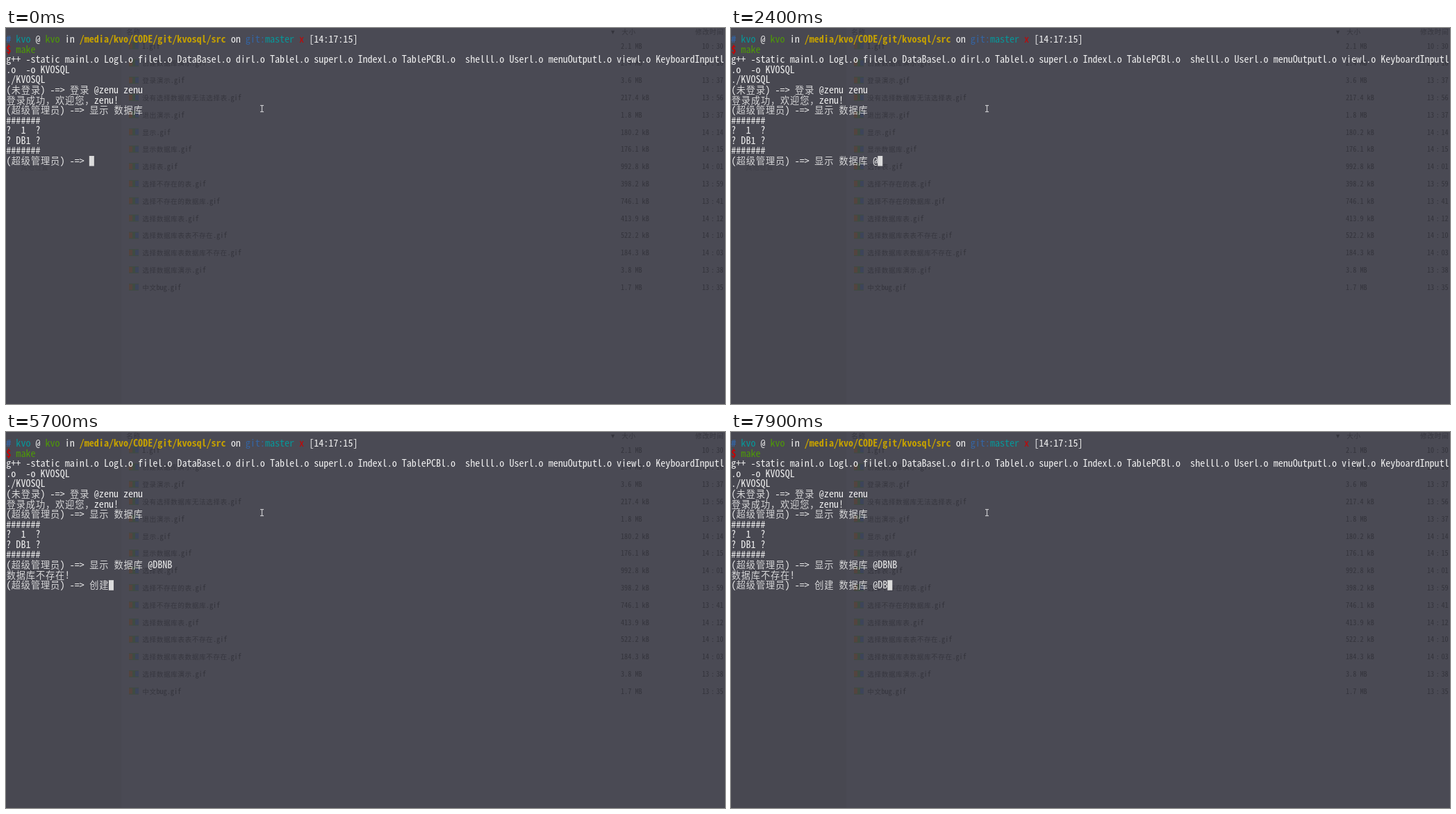
An HTML page with a canvas for the animation above (8000 ms loop, 1035 by 541 pixels).

```html
<!DOCTYPE html>
<html lang="zh-CN">
<head>
<meta charset="utf-8">
<title>Terminal</title>
<style>
html, body { margin: 0; width: 100%; height: 100%; overflow: hidden; background: #4a4a54; }
canvas { display: block; }
</style>
</head>
<body>
<canvas id="stage" width="1035" height="541"></canvas>
<script>
const ctx = document.getElementById('stage').getContext('2d');
const LOOP = 8000, CELL = 7.03, LINE = 14.57, TOP = 9.2;
const WHITE = '#f0f0f0', RED = '#cc0000', GREEN = '#4e9a06', BLUE = '#3465a4', CYAN = '#06989a', GOLD = '#c4a000';
const DIM = '#34343c';
const FONTS = '"Noto Sans Mono CJK SC", "Noto Sans CJK SC", "Noto Sans Mono CJK JP", "Noto Sans CJK JP", "Noto Sans CJK", monospace';
const LIGHT_FONTS = '"Noto Sans CJK SC Light", "Noto Sans CJK SC DemiLight", ' + FONTS;
const PROMPT = '(超级管理员) -=> ';

const isWide = ch => /[\u2e80-\uffff]/.test(ch);

// Text on a monospaced grid: wide characters take two cells, in a thinner and
// slightly smaller face. Returns the end x.
function grid(text, x, y, cell, color, weight = 400) {
  ctx.fillStyle = color;
  ctx.textAlign = 'center';
  for (const ch of text) {
    const wide = isWide(ch), width = wide ? 2 * cell : cell;
    ctx.font = wide ? `300 ${1.88 * cell}px ${LIGHT_FONTS}` : `${weight} ${2 * cell}px ${FONTS}`;
    ctx.globalAlpha = wide ? 0.85 : 1;
    if (ch !== ' ') ctx.fillText(ch, x + width / 2, y);
    x += width;
  }
  ctx.globalAlpha = 1;
  return x;
}

function rect(x, y, w, h, color, radius = 0) {
  ctx.fillStyle = color;
  ctx.beginPath();
  ctx.roundRect(x, y, w, h, radius);
  ctx.fill();
}

function poly(points, color) {
  ctx.strokeStyle = color;
  ctx.lineWidth = 1.2;
  ctx.beginPath();
  points.forEach(([x, y]) => ctx.lineTo(x, y));
  ctx.stroke();
}

const line = (row, text, color = WHITE, x = 0.3, weight) =>
  grid(text, x, TOP + row * LINE + 12, CELL, color, weight);

const files = [
  ['1', '2.1 MB', '10:30'],
  ['创建数据库演示', '2.4 MB', '14:16'],
  ['登录演示', '3.6 MB', '13:37'],
  ['没有选择数据库无法选择表', '217.4 kB', '13:56'],
  ['退出演示', '1.8 MB', '13:37'],
  ['显示', '180.2 kB', '14:14'],
  ['显示数据库', '176.1 kB', '14:15'],
  ['选择表', '992.8 kB', '14:01'],
  ['选择不存在的表', '398.2 kB', '13:59'],
  ['选择不存在的数据库', '746.1 kB', '13:41'],
  ['选择数据库表', '413.9 kB', '14:12'],
  ['选择数据库表表不存在', '522.2 kB', '14:10'],
  ['选择数据库表数据库不存在', '184.3 kB', '14:03'],
  ['选择数据库演示', '3.8 MB', '13:38'],
  ['中文bug', '1.7 MB', '13:35'],
];

function drawFiles() {
  const dim = (text, x, y) => grid(text, x, y + 4, 5.1, DIM);
  rect(0, 0, 166, 541, '#484851');
  dim('名称', 173, 5);
  dim('▾', 871, 5);
  dim('大小', 886, 5);
  dim('修改时间', 992, 5);
  grid('其他位置', 21, 204, 5, '#3e3e47');
  files.forEach(([name, size, time], i) => {
    const y = 25.5 + i * 24.8;
    const [hours, minutes] = time.split(':');
    rect(177, y - 5, 14, 10, '#3f4b42');
    rect(177, y - 4, 5, 8, '#54443f');
    rect(186, y - 4, 5, 8, '#3d445a');
    dim(name + '.gif', 196, y);
    dim(size, 885, y);
    dim(hours, 1002, y);
    dim(':', 1014.7, y);
    dim(minutes, 1022.4, y);
  });
}

const header = [
  ['# ', BLUE, 700], ['kvo ', CYAN], ['@ ', WHITE], ['kvo ', GREEN], ['in ', WHITE],
  ['/media/kvo/CODE/git/kvosql/src ', GOLD, 700], ['on ', WHITE], ['git:', BLUE],
  ['master ', CYAN], ['x ', RED], ['[14:17:15]', WHITE],
];

const output = [
  'g++ -static mainl.o Logl.o filel.o DataBasel.o dirl.o Tablel.o superl.o Indexl.o TablePCBl.o  shelll.o Userl.o menuOutputl.o viewl.o KeyboardInputl',
  '.o  -o KVOSQL',
  './KVOSQL',
  '(未登录) -=> 登录 @zenu zenu',
  '登录成功，欢迎您，zenu!',
  PROMPT + '显示 数据库',
  '#######',
  '?  1  ?',
  '? DB1 ?',
  '#######',
];

function drawOutput() {
  let x = 0.3;
  for (const [text, color, weight] of header) x = line(0, text, color, x, weight);
  line(1, 'make', GREEN, line(1, '$ ', RED, 0.3, 700));
  output.forEach((text, i) => line(i + 2, text));
}

const DATABASE = [
  ['s', '是 说 上 时 三 事 四'],
  ['shu', '数 书 树 属 输 术 熟'],
  ['shu j', '数据 书籍 树 数 书 属 输'],
  ['shu ju', '数据 书局 数 书 树 属 输'],
  ['shu ju ku', '数据库 数据 书局 书剧 数句 输局 书橘裤'],
];
const SHOW = [
  ['x', '下 想 小 学 新 先 向'],
  ['xi', '系 西 洗 喜 细 戏 息'],
  ['xia', '下 夏 吓 虾 瞎 峡 霞'],
  ['xian', '先 现 线 县 限 显 闲'],
  ['xian s', '先生 显示 现实 先 现 线 县'],
  ['xian shi', '显示 现实 限时 先是 线式 闲事 县市'],
];
const CREATE = [
  ['c', '成 层 从 槽 查 冲 出'],
  ['ch', '成 查 冲 出 吃 车 长'],
  ['chu', '出 处 除 初 楚 触 储'],
  ['chuan', '传 船 穿 川 串 喘 椽'],
  ['chuang j', '创建 窗 床 创 闯 疮 幢'],
  ['chuang jian', '创建 创见 床间 窗间 床键 窗键 床剑'],
];

// Each step: [time, typed text, optional input-method state]
const compose = (times, typed, states) => states.map((state, i) => [times[i], typed, state]);
const every = (start, count) => Array.from({ length: count }, (_, i) => start + i * 100);
const NEXT = 3700;
const steps = [
  [0, ''],
  ...compose(every(400, 6), '', SHOW),
  [1000, '显示'], [1100, '显示 '],
  ...compose(every(1300, 5), '显示 ', DATABASE),
  [1800, '显示 数据库'], [1900, '显示 数据库 '],
  [2400, '显示 数据库 @'], [3100, '显示 数据库 @DBNB'],
  [NEXT, ''],
  ...compose([4900, 5000, 5100, 5300, 5400, 5500], '', CREATE),
  [5700, '创建'], [6100, '创建 '],
  ...compose(every(6400, 5), '创建 ', DATABASE),
  [6900, '创建 数据库'], [7000, '创建 数据库 '],
  [7500, '创建 数据库 @'], [7800, '创建 数据库 @D'], [7900, '创建 数据库 @DB'],
];

function drawPopup(cursorX, rowTop, [pinyin, words]) {
  const left = cursorX - 12.8, top = rowTop + 21.2, tip = cursorX + 3.5;
  const items = words.split(' ');
  const itemWidth = word => 15 + 8.2 * word.length;
  const total = items.reduce((sum, word) => sum + itemWidth(word), 0);
  rect(left, top, total + 38.6, 35.5, '#f6f5f4', 5);
  ctx.beginPath();
  ctx.moveTo(tip - 7, top + 0.5);
  ctx.lineTo(tip, top - 7);
  ctx.lineTo(tip + 7, top + 0.5);
  ctx.fill();
  grid(pinyin + '_', left + 4, top + 12, 4.1, '#2e3436');
  let x = left + 4;
  items.forEach((word, i) => {
    if (!i) rect(x, top + 16, itemWidth(word), 15.5, '#3584e4', 2);
    grid(`${i + 1} ${word}`, x + 3.5, top + 26, 4.1, i ? '#2e3436' : '#fff');
    x += itemWidth(word);
  });
  x += 4;
  const mid = top + 24;
  ctx.lineWidth = 1;
  ctx.strokeStyle = '#d5d0cc';
  ctx.strokeRect(x, mid - 7.5, 13, 15);
  rect(x + 13, mid - 7.5, 13, 15, '#fff', 2);
  ctx.strokeRect(x + 13, mid - 7.5, 13, 15);
  poly([[x + 8, mid - 3], [x + 5, mid], [x + 8, mid + 3]], '#8b8e8f');
  poly([[x + 18, mid - 3], [x + 21, mid], [x + 18, mid + 3]], '#202426');
}

function drawInput(t) {
  const [, typed, state] = steps.findLast(step => step[0] <= t);
  const row = t < NEXT ? 12 : 14, y = TOP + row * LINE;
  if (t >= NEXT) {
    line(12, PROMPT + '显示 数据库 @DBNB');
    line(13, '数据库不存在!');
  }
  const x = line(row, PROMPT + typed);
  rect(x, y, CELL, LINE, '#dcdcdc');
  if (state) drawPopup(x, y, state);
}

function drawPointer() {
  const x = 368.5, y = 116;
  poly([[x - 2.5, y - 4.5], [x + 2.5, y - 4.5]], '#c8c8cc');
  poly([[x, y - 4.5], [x, y + 4.5]], '#c8c8cc');
  poly([[x - 2.5, y + 4.5], [x + 2.5, y + 4.5]], '#c8c8cc');
}

function frame() {
  rect(0, 0, 1035, 541, '#4a4a54');
  drawFiles();
  drawOutput();
  drawInput(performance.now() % LOOP);
  drawPointer();
  requestAnimationFrame(frame);
}
frame();
</script>
</body>
</html>
```
